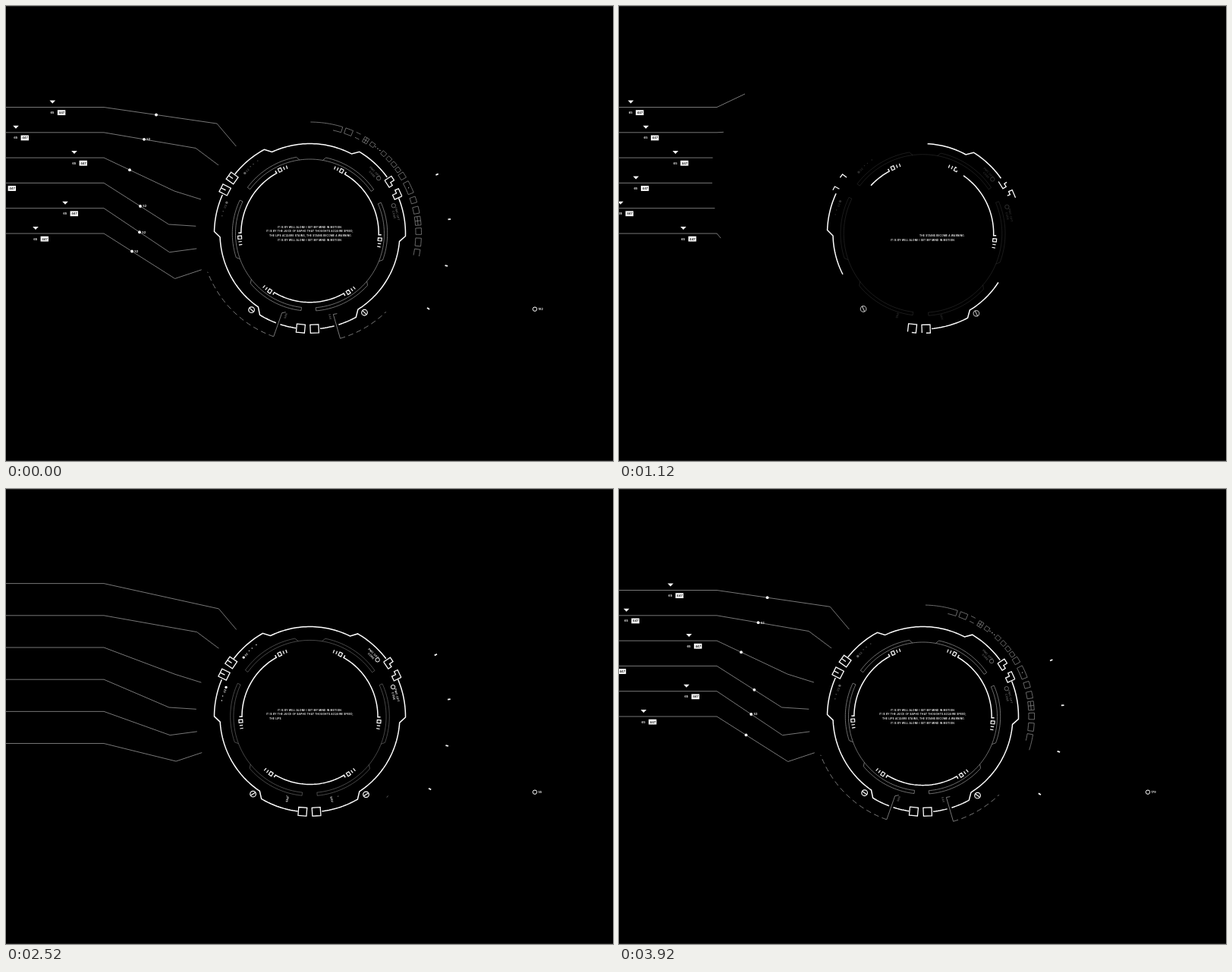
These frames come from a looping animation (800 px wide and 600 px high, 3.96 s). An HTML page with a canvas:

```html
<!DOCTYPE html>
<html lang="en">
<head>
<meta charset="utf-8">
<title>Radial interface</title>
<style>
html, body { margin: 0; width: 100%; height: 100%; overflow: hidden; background: #000; }
canvas { display: block; width: 800px; height: 600px; }
</style>
</head>
<body>
<canvas id="stage" width="800" height="600"></canvas>
<script>
const ctx = document.getElementById('stage').getContext('2d');
const LOOP = 3960, STEP = 40, REBUILD = 1540;
const CX = 400.5, CY = 300;
const GREY = '#858585';

const clamp = v => Math.max(0, Math.min(1, v));
const ramp = (t, start, length) => clamp((t - start) / length);
const smooth = (t, start, length) => {
  const u = ramp(t, start, length);
  return u * u * (3 - 2 * u);
};
const rad = deg => deg * Math.PI / 180;

// Angles run clockwise from twelve o'clock.
const polar = (r, deg) => [CX + r * Math.sin(rad(deg)), CY - r * Math.cos(rad(deg))];

function arc(r, from, to) {
  const n = Math.max(1, Math.ceil(Math.abs(to - from) / 1.5));
  return Array.from({ length: n + 1 }, (_, i) => polar(r, from + (to - from) * i / n));
}

// Local x follows the ring clockwise, local y points inwards.
function placed(r, deg, points) {
  const [x, y] = polar(r, deg), c = Math.cos(rad(deg)), s = Math.sin(rad(deg));
  return points.map(([u, v]) => [x + u * c - v * s, y + u * s + v * c]);
}

function line(points, from = 0, to = 1, width = 1, color = '#fff') {
  if (to <= from) return;
  let length = 0;
  ctx.beginPath();
  points.forEach(([x, y], i) => {
    ctx.lineTo(x, y);
    if (i) length += Math.hypot(x - points[i - 1][0], y - points[i - 1][1]);
  });
  ctx.strokeStyle = color;
  ctx.lineWidth = width;
  if (from > 0 || to < 1) {
    ctx.setLineDash([length * (to - from), length * 2]);
    ctx.lineDashOffset = -length * from;
  }
  ctx.stroke();
  ctx.setLineDash([]);
  ctx.lineDashOffset = 0;
}

function disc(x, y, r, width = 0) {
  ctx.beginPath();
  ctx.arc(x, y, r, 0, Math.PI * 2);
  if (width) {
    ctx.strokeStyle = '#fff';
    ctx.lineWidth = width;
    ctx.stroke();
  } else {
    ctx.fillStyle = '#fff';
    ctx.fill();
  }
}

function setFont(size, spacing = 0) {
  ctx.font = `600 ${size}px Inter, sans-serif`;
  ctx.letterSpacing = spacing + 'px';
}

function label(str, x, y, size = 4, color = '#fff', spacing = 0) {
  setFont(size, spacing);
  ctx.fillStyle = color;
  ctx.fillText(str, x, y);
}

function turnedLabel(str, r, deg, turn) {
  const [x, y] = polar(r, deg);
  ctx.save();
  ctx.translate(x, y);
  ctx.rotate(rad(turn));
  ctx.textAlign = 'center';
  label(str, 0, 1.3, 3.6, '#fff', 0.2);
  ctx.restore();
}

function faded(alpha, draw) {
  if (alpha <= 0) return;
  ctx.globalAlpha = alpha;
  draw();
  ctx.globalAlpha = 1;
}

// A rectangle that starts in the middle of its outer side.
const box = (w, h) => [[0, -h], [w, -h], [w, h], [-w, h], [-w, -h], [0, -h]];

const verse = [
  ['IT IS BY WILL ALONE I SET MY MIND IN MOTION.', 358],
  ['IT IS BY THE JUICE OF SAPHO THAT THOUGHTS ACQUIRE SPEED,', 343],
  ['THE LIPS ACQUIRE STAINS, THE STAINS BECOME A WARNING.', 347],
  ['IT IS BY WILL ALONE I SET MY MIND IN MOTION.', 358]
];

function drawVerse(t) {
  const typed = t < LOOP ? Math.floor((t - REBUILD) * 0.111) : Infinity;
  const erased = Math.floor((t - LOOP - 400) * 0.175);
  let index = 0;
  verse.forEach(([str, left], row) => {
    const a = Math.max(0, Math.min(str.length, erased - index));
    const b = Math.max(0, Math.min(str.length, typed - index));
    index += str.length;
    if (b <= a) return;
    setFont(3.2, 0.23);
    const skip = ctx.measureText(str.slice(0, a)).width;
    label(str.slice(a, b), left + skip, 292.9 + row * 5.55, 3.2, '#fff', 0.23);
  });
}

function drawOuterRing(t, spin) {
  const from = smooth(t, LOOP + 690, 850), to = smooth(t, 1646, 690);
  for (let k = 0; k < 3; k++) {
    const o = spin + k * 120;
    line([...arc(126, o - 53, o - 29.8), ...arc(118.5, o - 26.3, o + 26.3),
      ...arc(126, o + 29.8, o + 52.5)], from, to, 1.5);
  }
  const divided = [...box(5.5, 5.8), [0, 1]];
  const notch = [[-5.5, 5], [-5.5, -5.5], [1, -5.5], [1, 0], [5.5, 0], [5.5, 5], [-5.5, 5]];
  const notchBack = notch.map(([x, y]) => [-x, -y]);
  const pairs = [[-60, divided, divided, 1610, 500], [60, notch, notchBack, 1740, 460],
    [180, box(5.5, 5.5), box(5.5, 5.5), 2000, 480]];
  pairs.forEach(([mid, first, second, start, length], i) => {
    const begin = smooth(t, LOOP + 640 + i * 160, 700), end = smooth(t, start, length);
    line(placed(125.8, mid - 4.15 + spin, first), begin, end, 1.3);
    line(placed(125.8, mid + 4.15 + spin, second), begin, end, 1.3);
  });
  faded(smooth(t, 1950, 200) * (1 - smooth(t, LOOP + 1000, 300)), () => {
    const tilt = 90 + (t - 2200) * 0.178;
    for (const deg of [-144, 144]) {
      const [x, y] = polar(126.7, deg + spin);
      const dx = 3.8 * Math.cos(rad(tilt)), dy = 3.8 * Math.sin(rad(tilt));
      disc(x, y, 3.8, 1.2);
      line([[x - dx, y - dy], [x + dx, y + dy]], 0, 1, 1.2);
    }
  });
}

function drawInnerRing(t, spin) {
  const r = 89.5 + 5 * (1 - ramp(t, 1680, 700)) ** 3 + Math.max(0, t - 3400) * 0.0022;
  const iconR = r + 1.8;
  const groups = [[180, 1630, 480], [-60, 1840, 360], [60, 2040, 400]];
  groups.forEach(([mid, start, length], i) => {
    const m = mid + spin * 0.6;
    const to = smooth(t, start, length), from = smooth(t, LOOP + 680 + i * 180, 420);
    line([polar(r + 3.5, m - 30.3), ...arc(r, m - 30.3, m + 30.3), polar(r + 3.5, m + 30.3)],
      from, to, 1.5);
    for (const side of [-1, 1]) {
      const grown = clamp(side < 0 ? to * 5 : to * 1.4 - 0.4);
      faded(1 - smooth(from, side < 0 ? 0.15 : 0.8, 0.2), () => {
        line(placed(iconR, m + side * 34, box(2, 2.4)), side < 0 ? from * 3 : 0, grown, 1.2);
        for (const gap of [37.5, 40])
          line([polar(iconR + 2.2, m + side * gap), polar(iconR - 2.2, m + side * gap)],
            0, grown, 1.2);
      });
    }
  });
}

function drawMiddleRing(t, spin) {
  const u = ramp(t, 2000, 1200);
  const r = 98 + 8 * (1 - u) ** 2 + Math.max(0, t - 4100) * 0.0064;
  const high = r + 4.2;
  faded(ramp(t, 2100, 650) * (1 - smooth(t, LOOP + 850, 400)), () => {
    for (let k = 0; k < 3; k++) {
      const o = k * 120 + spin * 0.7;
      line(arc(r, o - 54.5, o + 54.5), 0, 1, 0.8, '#8a8a8a');
      for (const side of [-1, 1])
        line([polar(r, o + side * 54.5), ...arc(high, o + side * 54.5, o + side * 11),
          polar(r, o + side * 9)], 0, 1, 0.8, '#8a8a8a');
    }
  });
}

function drawRingLabels(t, spin) {
  const dim = smooth(t, 3500, 350) * (1 - smooth(t, LOOP + 150, 400));
  faded(smooth(t, 2020, 340) * (1 - 0.62 * dim) * (1 - smooth(t, LOOP + 900, 300)), () => {
    for (const [dot, text, ticks] of [[-48.5, -46, [-43, -40.5, -37]], [-71, -73.5, [-77, -80]]]) {
      disc(...polar(117, dot + spin), 1.7);
      turnedLabel('02', 117, text + spin, text + spin);
      for (const deg of ticks) disc(...polar(118, deg + spin), 0.7);
    }
    for (const [ring, text] of [[49.8, 45], [70.2, 76]]) {
      disc(...polar(116.3, ring + spin), 2.7, 1);
      turnedLabel('PMC OPT', 118, text + spin, text + spin);
      turnedLabel('CORE', 113.5, text + spin, text + spin);
    }
    turnedLabel('SNE', 113, -165 + spin, -75 + spin);
    turnedLabel('SAV', 113, 165 + spin, 75 + spin);
  });
}

function drawBrackets(t, spin) {
  const to = smooth(t, 2480, 320), sweep = smooth(t, 2660, 500);
  const gone = smooth(t, LOOP + 150, 480);
  for (const [deg, turn] of [[-162, 50], [162.5, -28]]) {
    const a = deg + spin;
    if (to > 0 && gone < 1) line([polar(115, a), polar(131, a)], gone, to, 6, '#000');
    const top = polar(111, a);
    line([[top[0] + 5, top[1] - 1], top, polar(144, a)], gone, to, 0.9, GREY);
    const reach = Math.abs(turn) * sweep, sign = Math.sign(turn);
    for (let d = Math.abs(turn) * gone; d < reach; d += 4.5)
      line(arc(144, a + sign * d, a + sign * Math.min(d + 2.7, reach)), 0, 1, 0.9, GREY);
  }
}

// Cells along the outer strip: offset from the marked cell, angular width.
const cells = [[-44.3, 4], [-34.2, 2.6], [-30, 2.4], [-22.4, 2.4], [-18.4, 2.4], [-14.6, 2.5],
  [-11, 2.4], [-7, 3.2], [0, 6.6], [7, 3.2], [12.5, 3.6], [18.2, 4.6], [23.7, 3.4], [29.4, 4.2]];

function drawStrip(t) {
  const s = (t - 2800) / 1000, o = 86 - 10.8 * s - 6.2 * s * s;
  const front = 48 - 113 * smooth(t, 2480, 680);
  const back = 48 - 113 * smooth(t, 3800, 816);
  if (back <= front) return;
  const curve = (r, a, b) => {
    const from = Math.max(a, front), to = Math.min(b, back);
    if (to > from) line(arc(r, o + from, o + to), 0, 1, 0.8, GREY);
  };
  const rung = (deg, r0 = 139.5, r1 = 147) => {
    if (deg >= front && deg <= back)
      line([polar(r0, o + deg), polar(r1, o + deg)], 0, 1, 0.8, GREY);
  };
  const cell = (mid, width, r0, r1) => {
    curve(r0, mid - width / 2, mid + width / 2);
    curve(r1, mid - width / 2, mid + width / 2);
    rung(mid - width / 2, r0, r1);
    rung(mid + width / 2, r0, r1);
  };
  curve(147, -64.8, -48);
  curve(139.5, -52.5, -48);
  rung(-48);
  cells.forEach(([mid, width], i) => {
    const small = i > 1 && i < 7;
    cell(mid, width, small ? 140.5 : 139.5, small ? 146 : 147);
  });
  curve(147, -40.5, -38);
  curve(140, -40, -37.5);
  rung(-34.2);
  rung(18.2);
  curve(143, 16, 20.4);
  curve(143.2, -35.5, -33);
  for (const deg of [-28, -26.5, -25, 0])
    if (deg > front && deg < back) disc(...polar(143.3, o + deg), 0.6);
  curve(139.5, 33.2, 37);
  rung(33.2);
  curve(147, 33.2, 48);
}

function drawOrbit(t) {
  const w = (t - 3320) / 1000;
  const lead = w < 0 ? 58 - 5 * w + 2.9 * w * w : 58 - 5 * w - 23 * w * w + 2.3 * w ** 3;
  const low = 126 - 78 * smooth(t, 1950, 650);
  const high = 126 - 78 * smooth(t, LOOP + 240, 860);
  for (let i = 0; i < 8; i++) {
    const deg = lead + i * 19.1;
    if (deg > low && deg < high) line([polar(183, deg), polar(186.6, deg)], 0, 1, 1.8);
  }
}

function drawCounter(t) {
  if (t < 1893 || t > 5060) return;
  label(String(Math.round(27 + (t - 2200) * 0.0881)), 701.5, 401.4, 3.8);
  if (t > 2400) disc(697, 399.7, 2.7, 1);
}

// Each wire: angle, outward push, dot x and speed, dot end, caption time, tag rest x and offset.
const wires = [
  [-40.2, 75, 198, 62, 4400, Infinity, 14.3, 47],
  [-53.2, 37, 182, -38, 4950, 3900, 36, -23],
  [-72.6, 19, 163, 50, 4450, Infinity, 74, 16],
  [-86.3, 7, 177, -33, 4950, 3950, 23, -27],
  [-97.6, 14, 176, 46, 4400, 3880, 0, 78],
  [-108.5, 31, 166, -38, 4600, 3950, 86, -47]
];

function drawTag(x, y) {
  ctx.fillStyle = '#fff';
  ctx.beginPath();
  ctx.moveTo(x - 3.8, y - 9);
  ctx.lineTo(x + 3.8, y - 9);
  ctx.lineTo(x, y - 5);
  ctx.fill();
  label('65', x - 2.8, y + 8.5, 4);
  ctx.fillRect(x + 6.6, y + 3.7, 10.4, 6.8);
  label('447', x + 8.2, y + 8.5, 4, '#000');
}

function drawWires(t) {
  const spread = 33.3 + 45.8 * (1 - ramp(t, 1720, 1900)) ** 3;
  const push = t < LOOP ? 0.05 * ramp(t, 3320, 640)
    : Math.min(1.2, 0.05 + 0.95 * ((t - LOOP) / 760) ** 1.4);
  const to = smooth(t, 1640, 720), from = smooth(t, LOOP + 760, 740);
  const later = (t - LOOP) / 1000;
  wires.forEach(([deg, out, dotX, speed, dotEnd, captionAt, rest, shift], i) => {
    const y = 166.8 + (i - 1) * spread;
    const knee = polar(186 + out * push, deg);
    line([polar(150 + 11 * push, deg), knee, [129, y], [-20, y]], from, to, 0.9, GREY);
    if (t > 3520 + i * 30 && t < dotEnd) {
      const x = dotX + speed * later;
      const dotY = y + (knee[1] - y) * (x - 129) / (knee[0] - 129);
      disc(x, dotY, 1.9);
      if (t >= captionAt) label('52', x + 3.3, dotY + 1.4, 4);
    }
    faded(ramp(t, 3600, 160) * (1 - smooth(t, LOOP + 1180, 260)), () =>
      drawTag(rest + shift * Math.exp(-later / 0.305), y));
  });
}

function render(time) {
  const phase = Math.floor(time / STEP) * STEP % LOOP;
  // The build-up starts late in the loop, so its clock continues past the wrap.
  const t = phase < REBUILD ? phase + LOOP : phase;
  const spin = (t - 2200) * 0.00078;
  ctx.fillStyle = '#000';
  ctx.fillRect(0, 0, 800, 600);
  ctx.fillStyle = '#222';
  ctx.fillRect(0, 0, 800, 1);
  ctx.fillRect(0, 599, 800, 1);
  drawWires(t);
  drawStrip(t);
  drawOrbit(t);
  drawCounter(t);
  drawMiddleRing(t, spin);
  drawOuterRing(t, spin);
  drawInnerRing(t, spin);
  drawBrackets(t, spin);
  drawRingLabels(t, spin);
  drawVerse(t);
}

const began = performance.now();
function tick() {
  render(performance.now() - began);
  requestAnimationFrame(tick);
}
tick();
</script>
</body>
</html>
```
